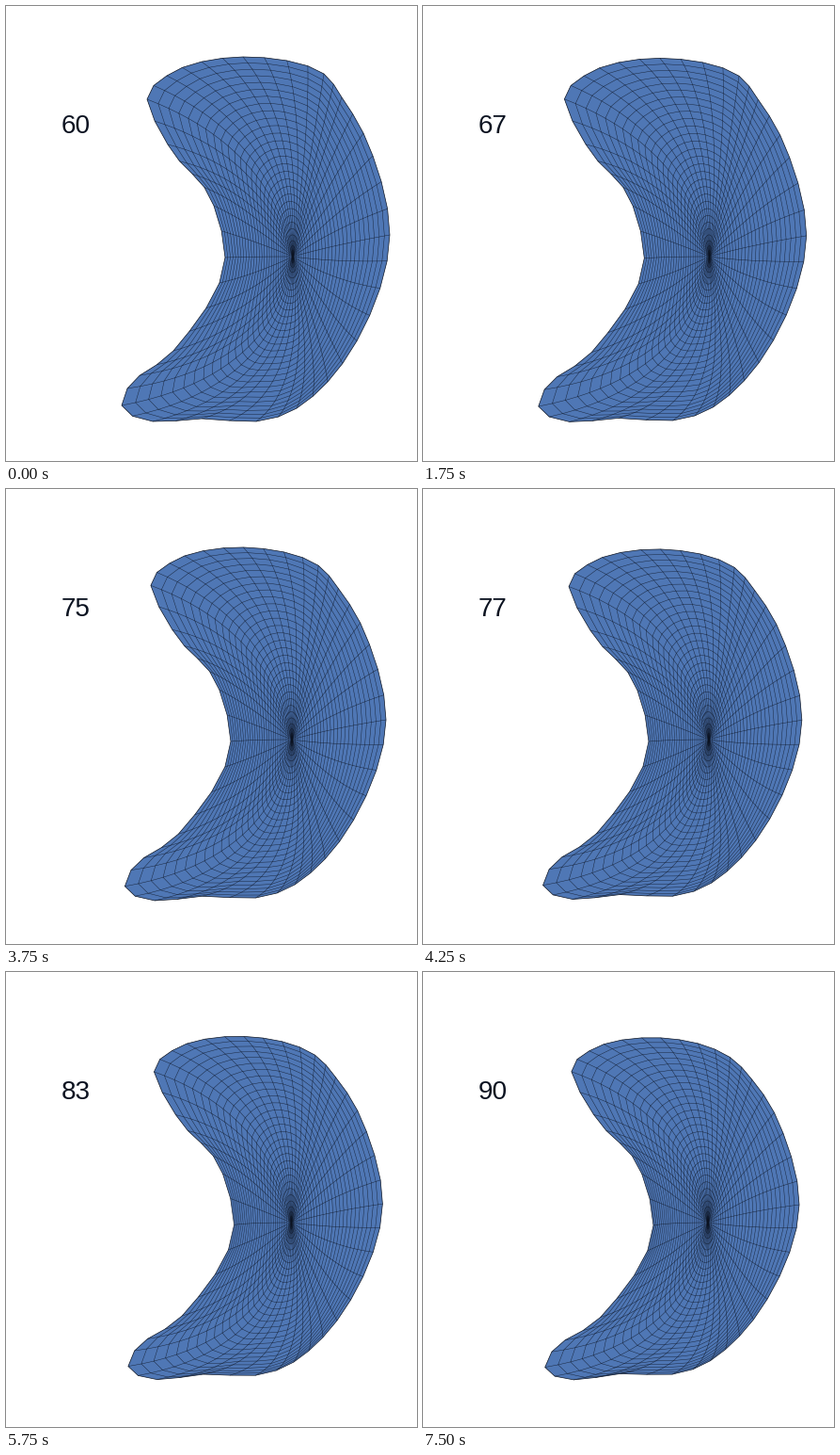
These frames come from a looping animation (437x483 px, 7750 ms). A matplotlib script:

```python
import numpy as np
import matplotlib.pyplot as plt
from matplotlib.animation import FuncAnimation
from matplotlib.collections import LineCollection

W, H = 437, 483
FIRST, LAST = 60, 90
SPOKES, RINGS = 50, 30
BLUE, INK = "#4f77b5", "#0b1220"

# Key points of the first silhouette: (spoke, x, y), counter-clockwise.
KNOTS = np.array([
    (0, 408, 243), (4, 380, 135), (6, 357, 97), (8, 338, 72), (12, 252, 54),
    (16, 171, 74), (18, 150, 99), (20, 172, 147), (24, 221, 212),
    (26, 233, 267), (30, 178, 366), (33, 129, 406), (34, 123, 424),
    (36, 156, 441), (38, 208, 438), (40, 266, 441), (44, 342, 399)], float)


def closed_curve(knots, period):
    """Cubic Hermite curve through the knots, sampled at every spoke."""
    k, p = knots[:, 0], knots[:, 1:]
    step = np.diff(k, append=k[0] + period)[:, None]
    rate = (np.roll(p, -1, axis=0) - p) / step
    before, rate_before = np.roll(step, 1), np.roll(rate, 1, axis=0)
    slope = (step * rate_before + before * rate) / (step + before)

    q = np.arange(period)
    i = np.searchsorted(k, q, side="right") - 1
    j = (i + 1) % len(k)
    h = step[i]
    v = (q - k[i])[:, None] / h
    return (p[i] * (1 + 2 * v) * (1 - v)**2 + p[j] * v**2 * (3 - 2 * v)
            + h * v * (1 - v) * (slope[i] * (1 - v) - slope[j] * v))


# Direction in which each spoke leaves the pole; spoke 26 points left.
index = np.arange(SPOKES)
phi = np.where(index <= 26, np.pi * (index + 0.7) / 26.7,
               np.pi + np.pi * (index - 26) / 23.3)
TANGENT = np.column_stack([42 * np.cos(phi), -145 * np.sin(phi)])

# Whole drift of the silhouette: it contracts while the shoulder flattens.
shoulder = np.exp(-((np.degrees(phi) - 62) / 14)**2)
DRIFT = np.column_stack([2 - 10 * np.cos(phi) - 9 * shoulder,
                         2 + 13 * np.sin(phi) + 6 * np.sin(2 * phi)])
BASE = closed_curve(KNOTS, SPOKES)
CENTRE = np.array([275, 250])
S = (np.linspace(0, 1, RINGS + 1)**1.4)[:, None, None]


def outline(t):
    """Silhouette at progress t, with a slight swell and then shrink."""
    shape = BASE + DRIFT * t
    return CENTRE + (shape - CENTRE) * (1 + 0.012 * np.sin(2 * np.pi * t))


def mesh(t):
    """Grid of points [ring, spoke]; each spoke is a quadratic curve."""
    pole = np.array([305 - 2 * t, 266])
    bend = pole + TANGENT
    return (1 - S)**2 * pole + 2 * S * (1 - S) * bend + S**2 * outline(t)


fig = plt.figure(figsize=(W / 100, H / 100), dpi=100, facecolor="white")
ax = fig.add_axes([0, 0, 1, 1])
ax.set_xlim(0, W)
ax.set_ylim(H, 0)
ax.axis("off")

body = ax.fill([0], [0], facecolor=BLUE, edgecolor=INK, linewidth=0.5)[0]
grid = LineCollection([], colors=INK, linewidths=0.35, alpha=0.8)
ax.add_collection(grid)
label = ax.text(58.5, 135, "", fontsize=20.1, family="Liberation Sans",
                color=INK, va="baseline")


def update(frame):
    points = mesh(frame / (LAST - FIRST))
    body.set_xy(points[-1])
    rings = np.concatenate([points, points[:, :1]], axis=1)
    grid.set_segments(list(rings[1:-1]) + list(points.transpose(1, 0, 2)))
    label.set_text(str(FIRST + frame))
    return body, grid, label


anim = FuncAnimation(fig, update, frames=LAST - FIRST + 1, interval=250,
                     repeat=True, repeat_delay=0)
plt.show()
```
